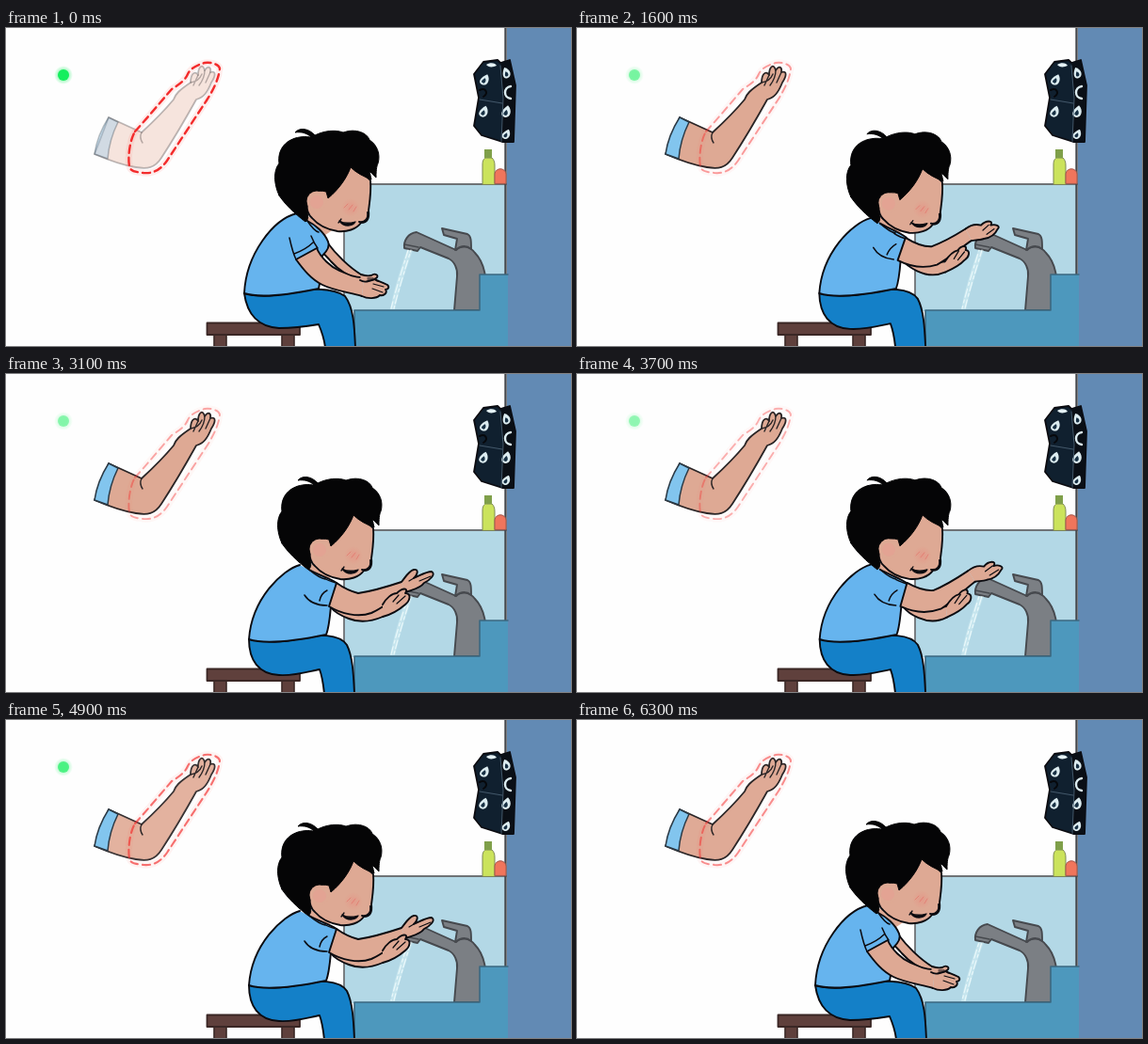
An HTML page with a canvas for the animation above (6400 ms loop, 600 by 338 pixels).

```html
<!DOCTYPE html>
<html lang="en">
<head>
<meta charset="utf-8">
<title>Washing up to the elbow</title>
<style>
html, body { margin: 0; width: 100%; height: 100%; overflow: hidden; background: #fefefe; }
canvas { display: block; width: 600px; height: 338px; }
</style>
</head>
<body>
<canvas id="stage" width="600" height="338"></canvas>
<script>
const ctx = document.getElementById('stage').getContext('2d');
const LOOP = 6400, STEP = 100, SCRUB = LOOP / 3, PULSE = 675;
const INK = '#0b0b10', SKIN = '#dea994', SHIRT = '#66b4ee', PANTS = '#1480c8';
const GREY_LINE = '#46494e';

const lerp = (a, b, k) => a + (b - a) * k;

// Blends two path strings that share the same commands.
function mixPath(a, b, k) {
  const ends = b.match(/-?\d+(\.\d+)?/g);
  let i = 0;
  return a.replace(/-?\d+(\.\d+)?/g, n => lerp(+n, +ends[i++], k).toFixed(2));
}

function mixPose(a, b, k) {
  const pose = {};
  for (const part in a) pose[part] = mixPath(a[part], b[part], k);
  return pose;
}

const low = {
  head: '0 0',
  shirt: 'M309 197 C284 203 255 240 253 282 C272 288 303 283 332 277 C334 268 336 255 336 242 C342 236 344 231 342 227 C338 217 328 209 320 205',
  pants: 'M253 282 C256 304 268 318 290 319 C308 319 320 317 332 315 C335 322 338 330 339 340 L371 340 C370 316 369 297 360 285 C348 276 318 276 300 281 C285 285 268 286 253 282',
  folds: 'M301 223 C303 232 305 240 308 246 M324 221 C326 226 328 230 331 234 M306 240 C314 237 321 233 326 228 M320 205 C324 211 328 216 332 217',
  nearArm: 'M378 285 C364 281 348 279 336 273 C324 267 316 257 308 246 L330 234 C334 244 345 254 354 258 C363 262 372 266 380 265',
  nearHand: 'M380 265 C384 263 389 264 393 268 C398 270 401 271 405 273 C408 276 405 278 403 278 C406 282 400 285 397 284 C393 288 384 288 378 285',
  fingers: 'M390 272 L401 275 M389 277 L400 281 M384 266 L390 266 M384 268 L389 268',
  farArm: 'M376 268 C364 264 352 256 345 248 C340 242 335 238 332 234 L342 229 C350 240 364 254 377 262',
  farHand: 'M377 262 C380 263 384 264 388 263 C392 260 397 263 393 266 C391 268 388 268 385 269 C382 270 379 270 376 268'
};

const high = {
  head: '3 2',
  shirt: 'M312 203 C294 208 261 238 258 282 C276 288 306 284 340 277 C343 270 344 258 345 247 C349 239 351 230 351 222 C344 217 330 213 322 208',
  pants: 'M258 282 C258 304 268 319 290 320 C308 321 322 316 333 314 C336 322 337 330 338 340 L370 340 C369 318 368 300 362 288 C354 276 330 276 312 281 C296 285 280 286 258 282',
  folds: 'M317 235 C322 243 332 246 341 246 M338 217 C342 220 347 221 351 222 M333 241 C334 236 337 232 341 230 M322 208 C327 212 333 217 339 218',
  nearArm: 'M424 232 C412 238 400 249 388 254 C374 259 356 255 343 247 L351 222 C358 227 366 231 374 233 C388 231 402 227 420 221',
  nearHand: 'M420 221 C424 216 428 209 433 208 C438 207 438 212 433 217 C440 214 446 210 452 210 C457 213 450 219 444 222 C440 228 432 229 424 232',
  fingers: 'M433 217 L428 220 M451 215 L439 220 M417 235 L411 242 M424 236 L415 244',
  farArm: 'M400 258 C386 264 374 264 364 260 C356 257 348 252 345 248 L352 243 C362 250 380 252 400 245',
  farHand: 'M400 245 C404 238 410 233 415 233 C421 227 428 227 424 233 C431 233 429 241 424 245 C416 252 408 256 400 258'
};

const reach = {
  ...mixPose(low, high, 0.35),
  head: '2 3',
  folds: low.folds,
  nearArm: 'M390 278 C372 276 352 275 340 269 C328 263 317 254 311 247 L332 236 C338 246 346 254 356 257 C366 260 380 262 390 262',
  nearHand: 'M390 262 C396 262 402 264 406 263 C412 262 418 261 424 260 C424 264 416 267 412 268 C420 268 414 275 408 274 C402 279 396 279 390 278',
  fingers: 'M400 267 L414 266 M399 272 L411 271 M393 262 L400 261 M393 264 L399 264',
  farArm: 'M386 262 C368 256 356 250 349 244 C343 240 338 237 335 234 L344 229 C352 238 366 249 386 258',
  farHand: 'M386 258 C392 258 398 258 404 257 C410 256 414 259 410 261 C406 263 402 263 398 264 C394 265 390 264 386 262'
};

const rub = {
  ...high,
  head: '1 2',
  nearArm: 'M426 216 C414 226 402 240 390 248 C376 254 360 253 346 247 L352 221 C362 226 370 229 380 228 C394 222 408 212 418 205',
  nearHand: 'M418 205 C424 200 430 199 435 200 C440 193 450 193 445 199 C450 197 458 199 454 203 C450 210 444 213 438 214 C434 215 430 215 426 216',
  fingers: 'M445 199 L436 205 M452 203 L441 209 M409 232 L402 242 M416 233 L407 243',
  farArm: 'M394 258 C384 264 374 264 364 260 C356 257 350 252 347 248 L353 243 C362 248 378 250 393 246',
  farHand: 'M393 246 C397 239 402 233 407 232 C411 226 418 225 416 231 C423 231 421 240 416 243 C410 250 402 254 394 258'
};

const cycle = [[0, low], [0.02, low], [0.078, reach], [0.24, high], [0.47, high],
  [0.53, rub], [0.72, rub], [0.93, low], [1, low]];

function poseAt(phase) {
  const i = cycle.findIndex(key => key[0] > phase);
  const [start, from] = cycle[i - 1], [end, to] = cycle[i];
  return mixPose(from, to, (phase - start) / (end - start));
}

function shape(path, fill, line = INK, width = 1.9) {
  const p = new Path2D(path);
  if (fill) { ctx.fillStyle = fill; ctx.fill(p); }
  if (line) { ctx.strokeStyle = line; ctx.lineWidth = width; ctx.stroke(p); }
}

function rect(x, y, w, h, fill) {
  ctx.fillStyle = fill;
  ctx.fillRect(x, y, w, h);
}

function disc(x, y, r, fill) {
  ctx.fillStyle = fill;
  ctx.beginPath();
  ctx.arc(x, y, r, 0, Math.PI * 2);
  ctx.fill();
}

function paisley(x, y, size, angle) {
  ctx.save();
  ctx.translate(x, y);
  ctx.rotate(angle);
  ctx.scale(size, size);
  shape('M0 -7 C7 -3 6 6 0 6 C-6 6 -5 -1 0 -7', '#dcecf0', null);
  shape('M0 -2 C3 0 3 4 0 4 C-3 4 -2 1 0 -2', '#173044', null);
  ctx.restore();
}

function drawBag() {
  const outline = 'M497 49 L507 36 L522 34 L525 37 L535 34 L541 61 L539 121 L527 121 L505 114 L497 104 L502 74 Z';
  shape(outline, '#10202f', INK, 1.8);
  ctx.save();
  ctx.clip(new Path2D(outline));
  shape('M525 34 L528 75 L526 122 L545 122 L545 34 Z', '#0a0f16', null);
  paisley(508, 55, 0.95, 0.5);
  paisley(507, 89, 0.95, 0.4);
  paisley(531, 48, 0.9, -0.3);
  paisley(531, 89, 1, 0.3);
  paisley(531, 113, 0.85, 0.5);
  shape('M510 39 C514 36 520 37 521 40 C517 42 512 42 510 39', '#e5f2f5', null);
  shape('M503 66 C509 63 513 69 507 73', null, '#06080c', 2);
  shape('M525 40 L528 75 L526 121 M503 76 L527 80', null, '#51677a', 0.8);
  shape('M536 62 C528 63 528 74 536 75', null, '#dcecf0', 2.4);
  ctx.restore();
}

function drawTap() {
  const metal = '#7b7f84';
  shape('M476 300 L479 264 C480 256 476 248 470 245 L440 233 L437 237 L423 234 C422 226 427 218 436 217 L478 236 C484 230 493 232 498 239 C508 249 511 264 511 300 Z', metal, GREY_LINE);
  shape('M463 213 L490 219 C494 221 494 226 494 235 C488 230 482 232 477 236 L479 224 L465 220 Z', metal, GREY_LINE);
  shape('M423 230 L438 233', null, GREY_LINE, 1.4);
}

function drawWater(time) {
  ctx.save();
  shape('M426 236 L432 236 C425 255 418 278 413 299 L408 299 C412 278 419 255 426 236', 'rgba(226,247,250,.4)', null);
  ctx.setLineDash([9, 3, 3, 4]);
  for (let i = 0; i < 2; i++) {
    ctx.lineDashOffset = -time * 0.11 + i * 7;
    shape(`M${427 + i * 3} 236 C${421 + i * 3} 256 ${414 + i * 3} 278 ${409 + i * 3} 298`, null, 'rgba(246,255,255,.75)', 1.2);
  }
  ctx.restore();
}

function drawRoom(time) {
  rect(0, 0, 600, 338, '#fefefe');
  rect(359, 166, 172, 135, '#b3d8e6');
  shape('M359 300 L359 166 L531 166', null, '#6f7376', 1.8);
  rect(532, 0, 68, 338, '#628ab4');
  shape('M530.5 0 L530.5 262', null, '#45484d', 2.4);
  shape('M506 166 L506 145 C506 140 508 139 509 138 L516 138 C518 140 519 142 519 146 L519 166 Z', '#cbe35c', '#7d8755', 1);
  rect(508, 129, 8, 9, '#7f9f4a');
  shape('M519 165 L519 155 C520 148 530 148 531 155 L531 165 Z', '#f0755c', '#a5584c', 1);
  drawBag();
  drawTap();
  shape('M370 338 L370 300 L503 300 L503 262 L533 262 L533 338 Z', '#4d98bd', null);
  shape('M370 338 L370 300 L503 300 L503 262 L533 262', null, '#3b6880', 1.6);
  drawWater(time);
  for (const x of [221, 293]) shape(`M${x} 325 h13 v16 h-13 Z`, '#5f403c', '#3a2725', 1.6);
  shape('M213.5 313.5 H312 V326 H213.5 Z', '#5f403c', '#3a2725', 1.8);
}

function drawHead(offset) {
  ctx.save();
  ctx.translate(...offset.split(' ').map(Number));
  shape('M367 146 C376 153 384 158 387 162 C388 175 386 186 385 194 C386 202 384 207 377 207 C372 214 362 217 352 216 C340 214 331 209 325 202 C318 196 316 180 330 170 Z', SKIN);
  shape('M290 178 C284 165 284 151 290 144 C288 128 298 118 312 116 C318 115 322 116 324 116 C320 112 314 110 307 111 C312 105 322 107 328 114 C338 109 350 108 358 111 C372 106 384 112 386 119 C394 124 398 134 395 144 C394 146 393 149 393 159 L386 152 L388 161 C380 158 372 154 366 148 C362 159 354 171 342 181 L340 174 C330 171 322 176 320 185 C318 195 324 202 318 206 C306 197 296 187 290 178 Z', '#050506', '#050506', 1);
  disc(330, 184, 10.5, SKIN);
  disc(330, 185, 7, 'rgba(240,150,145,.3)');
  disc(378, 200, 5.2, SKIN);
  shape('M384 196 C385 203 381 207 375 206', null);
  shape('M354 205 C359 208 364 208 371 206 C368 211 359 212 354 205 M353 207 L356 203', INK, INK, 1.3);
  const blush = ctx.createRadialGradient(366, 191, 1, 366, 191, 10);
  blush.addColorStop(0, 'rgba(240,115,110,.25)');
  blush.addColorStop(1, 'rgba(240,115,110,0)');
  disc(366, 191, 10, blush);
  shape('M359 191 L363 187 M364 193 L368 188 M369 195 L372 190', null, 'rgba(228,92,88,.45)', 1);
  ctx.restore();
}

function drawBoy(pose) {
  shape(pose.farArm, SKIN);
  shape(pose.pants, PANTS);
  shape('M312 196 L348 214 L336 222 L318 210 Z', SKIN, null);
  shape(pose.shirt, SHIRT);
  shape(pose.folds, null, INK, 1.5);
  shape(pose.nearArm, SKIN);
  shape(pose.nearHand, SKIN);
  shape(pose.farHand, SKIN);
  shape(pose.fingers, null, INK, 1.2);
  drawHead(pose.head);
}

function drawGuide(time) {
  const pulse = 0.68 + 0.32 * Math.cos(time / PULSE * Math.PI * 2);
  const arm = 'M94 134 L109 95 L144 111 C156 100 168 88 178 76 C180 70 184 66 196 58 C196 50 200 44 204 50 C204 41 209 37 211 45 C215 39 218 42 217 47 C224 45 222 52 218 58 C214 68 210 74 202 76 C192 94 180 115 165 138 C158 149 150 150 138 148 C124 146 108 140 94 134 Z';
  const dashes = 'M137 110 C148 98 163 80 176 65 C184 60 190 56 193 49 C197 41 205 39 211 37 C219 36 226 39 227 43 C226 54 220 66 213 77 L171 141 C164 151 156 155 146 154 C139 153 132 153 131 147 C129 136 132 118 137 110 Z';
  ctx.save();
  ctx.globalAlpha = Math.min(1, 0.32 + time / 400);
  shape(arm, SKIN, '#2b2526', 1.8);
  shape(arm, `rgba(255,232,226,${Math.max(0, pulse - 0.5) * 0.85})`, null);
  shape('M94 134 C96 120 102 106 109 95 L119 100 C113 112 109 126 108 139 Z', '#82c5ee', '#2b3a46', 1.5);
  shape('M144 111 C142 115 143 119 145 122 M196 58 C203 57 206 54 208 49 M204 50 L199 61 M211 45 C211 51 208 57 205 61 M217 47 L212 58', null, '#2b2526', 1.4);

  ctx.globalAlpha = pulse * 0.1;
  shape(dashes, null, '#ff5a50', 7);
  ctx.globalAlpha = pulse;
  ctx.setLineDash([8, 5]);
  shape(dashes, null, '#f32c2c', 1.6 + pulse * 0.8);
  ctx.setLineDash([]);

  if (time < LOOP - STEP) {
    const glow = ctx.createRadialGradient(61, 50, 4, 61, 50, 10);
    glow.addColorStop(0, 'rgba(22,238,94,.5)');
    glow.addColorStop(1, 'rgba(22,238,94,0)');
    disc(61, 50, 10, glow);
    disc(61, 50, 6, '#16ee5e');
  }
  ctx.restore();
}

function draw(now) {
  const time = Math.floor(now % LOOP / STEP) * STEP;
  drawRoom(time);
  drawBoy(poseAt(time % SCRUB / SCRUB));
  drawGuide(time);
  requestAnimationFrame(draw);
}

ctx.lineJoin = ctx.lineCap = 'round';
draw(0);
</script>
</body>
</html>
```
